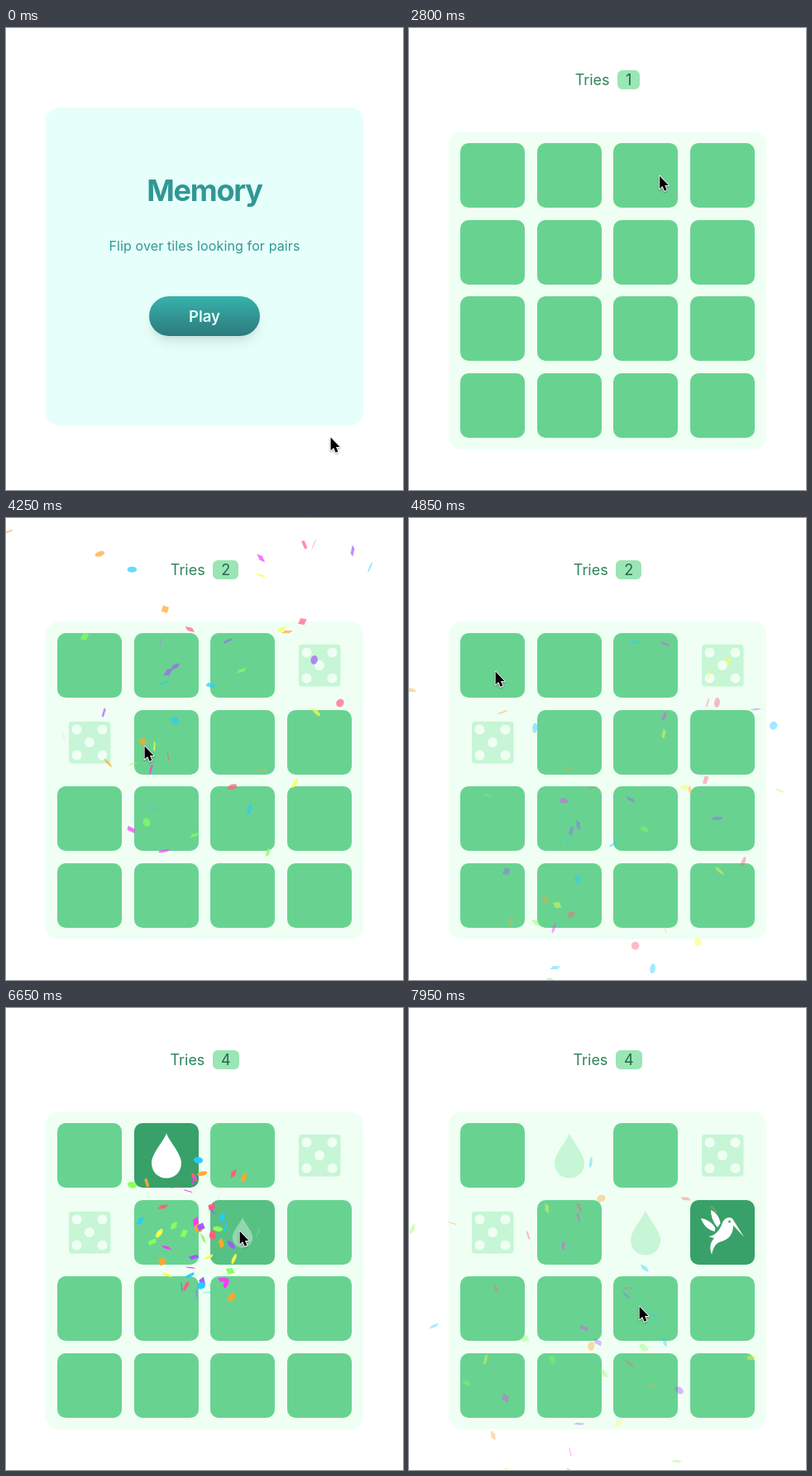
Recreate the animation shown at these times as an HTML page with a canvas. Size 480 px wide and 558 px high, loop 8000 ms.

```html
<!DOCTYPE html>
<html lang="en">
<head>
<meta charset="utf-8">
<title>Memory</title>
<style>
  html, body { margin: 0; width: 100%; height: 100%; overflow: hidden; background: #fff; }
  #stage { position: relative; width: 480px; height: 558px; overflow: hidden; font-family: Inter, "Open Sans", sans-serif; }
  #stage > svg, canvas { position: absolute; left: 0; top: 0; }
  #start { position: absolute; left: 48px; top: 96px; width: 384px; height: 384px; border-radius: 16px; background: #e6fffa; color: #319795; text-align: center; }
  #start > * { position: absolute; left: 0; right: 0; white-space: nowrap; }
  h1 { margin: 0; top: 76px; font-size: 36px; line-height: 48px; letter-spacing: -1.2px; }
  p { margin: 0; top: 155px; font-size: 16px; line-height: 24px; letter-spacing: .13px; }
  #start .play { left: 125px; right: auto; top: 228px; width: 134px; height: 48px; border-radius: 24px; font: 600 18.5px/49px Inter, "Open Sans", sans-serif; color: #e6fffa; background: linear-gradient(#38b2ac, #2c7a7b); }
  #tries { position: absolute; left: 0; right: 0; top: 51px; display: flex; justify-content: center; font-size: 18px; line-height: 23px; color: #2f855a; }
  #count { margin-left: 9.5px; padding: 0 10px; border-radius: 6px; background: #9ae6b4; color: #276749; }
</style>
</head>
<body>
<div id="stage">
  <div id="start">
    <h1>Memory</h1>
    <p>Flip over tiles looking for pairs</p>
    <div class="play">Play</div>
  </div>
  <div id="game">
    <div id="tries">Tries<span id="count">0</span></div>
  </div>
  <svg id="board" width="480" height="558">
    <rect x="48" y="125" width="384" height="384" rx="16" fill="#f0fff4"/>
  </svg>
  <canvas width="480" height="558"></canvas>
  <svg width="480" height="558">
    <g id="cursor" style="filter: drop-shadow(0 1px 1px rgba(0,0,0,.35))">
      <path d="M.6 1.6V17.3L4.2 14 6.6 19.8 9.4 18.6 7 13H11.6Z" stroke="#fff" stroke-width="1.8" stroke-linejoin="round" paint-order="stroke"/>
    </g>
  </svg>
</div>
<script>
const LOOP = 8000, GAME_START = 600, RESOLVE = 600;
const $ = q => document.querySelector(q);
const clamp = v => Math.max(0, Math.min(1, v));
const smooth = k => k * k * (3 - 2 * k);

const dot = (x, y, r) => `M${x - r} ${y}a${r} ${r} 0 1 0 ${2 * r} 0a${r} ${r} 0 1 0 ${-2 * r} 0Z`;
const pips = [-1, 1].flatMap(i => [-1, 1].map(j => dot(39 + 15.5 * i, 39 + 15.5 * j, 6))).join('') + dot(39, 39, 6);
const icons = {
  heart: 'M39 65C36 62 13 48 13 27C13 17 20 12.5 26.5 12.5C33 12.5 37 16.5 39 20C41 16.5 45 12.5 51.5 12.5C58 12.5 65 17 65 27C65 48 42 62 39 65Z',
  drop: 'M39 12.3C37 20 21 37 21 48C21 59 29 66.5 39 66.5S57 59 57 48C57 37 41 20 39 12.3Z',
  dice: 'M18 13.7H60.5a4 4 0 0 1 4 4V60.5a4 4 0 0 1-4 4H18a4 4 0 0 1-4-4V17.7a4 4 0 0 1 4-4Z' + pips,
  moon: 'M45 13A27 27 0 1 0 65 47A22 22 0 0 1 45 13Z',
  bird: 'M25 12C31 15 35.5 20 36.5 28L33 33C28 27 25 20 25 12ZM13 22C20 23 27 27 30.5 34L29.5 38C22 36 16 31 13 22Z'
    + 'M38 30C40 22 47 18.5 51.5 23L65 44.5L52 30.5C52 41 47 48 36 50.5C30 53 28 58 26 65.5C23 58 24 51 29 46L22 44C30 43 35 37 38 30Z' + dot(47.5, 26, 1.4)
};

// Two flips make a try
const flips = [
  { tile: 1, icon: 'drop', at: 1730 }, { tile: 2, icon: 'moon', at: 2140 },
  { tile: 3, icon: 'dice', at: 3130 }, { tile: 4, icon: 'dice', at: 3530 },
  { tile: 0, icon: 'heart', at: 4880 }, { tile: 6, icon: 'drop', at: 5440 },
  { tile: 1, icon: 'drop', at: 6360 }, { tile: 6, icon: 'drop', at: 6550 },
  { tile: 7, icon: 'bird', at: 7470 }
];
const tries = [];
for (let i = 0; i + 1 < flips.length; i += 2) {
  const [a, b] = flips.slice(i, i + 2);
  a.end = b.end = b.at + RESOLVE;
  a.matched = b.matched = a.icon === b.icon;
  tries.push(b);
}

// Cursor stops: arrive, leave, x, y
const stops = [
  [0, 70, 392, 493], [200, 200, 262, 195], [250, 1545, 284, 352], [1720, 1780, 195, 165],
  [1880, 1880, 245, 62], [2000, 2790, 302, 177], [3060, 3160, 372, 186], [3480, 3700, 104, 272],
  [4250, 4400, 167, 274], [4800, 4960, 104, 184], [5280, 6240, 279, 267], [6340, 6400, 200, 184],
  [6530, 6900, 282, 268], [7250, 7550, 355, 271], [7920, LOOP, 278, 359]
];

const svg = (tag, attrs, parent) => {
  const el = document.createElementNS('http://www.w3.org/2000/svg', tag);
  for (const k in attrs) el.setAttribute(k, attrs[k]);
  return parent.appendChild(el);
};

const board = $('#board');
const tiles = Array.from({ length: 16 }, (_, i) => {
  const x = Math.round(62.4 + 92.4 * (i % 4)), y = Math.round(139.4 + 92.4 * Math.floor(i / 4));
  const g = svg('g', {}, board);
  const back = svg('rect', { width: 78, height: 78, rx: 10 }, g);
  const icon = svg('path', { 'fill-rule': 'evenodd' }, g);
  return { x, y, g, back, icon };
});

const scaled = k => `translate(39 39) scale(${k}) translate(-39 -39)`;

function drawTile(tile, i, t) {
  const k = clamp((t - GAME_START - 20 * i) / 330) - 1;
  const pop = 1 + 2.4 * k ** 3 + 1.4 * k ** 2;
  tile.g.setAttribute('transform', `translate(${tile.x} ${tile.y}) ${scaled(Math.max(0, pop))}`);

  const flip = flips.filter(f => f.tile === i && f.at <= t).pop();
  const done = flip && t >= flip.end, matched = done && flip.matched;
  const open = flip && !done ? smooth(clamp((t - flip.at) / 250)) : 0;
  tile.back.style.fill = `color-mix(in srgb, #38a169 ${open * 100}%, #68d391)`;
  tile.back.style.opacity = matched ? 0 : 1;
  tile.icon.style.opacity = matched ? 1 : open;
  if (flip) {
    tile.icon.setAttribute('d', icons[flip.icon]);
    tile.icon.setAttribute('fill', matched ? '#c6f6d5' : '#fff');
    tile.icon.setAttribute('transform', scaled(matched ? 1 : .5 + .5 * open));
  }
}

const colors = ['#26ccff', '#a25afd', '#ff5e7e', '#88ff5a', '#fcff42', '#ffa62d', '#ff36ff'];
const ORIGIN = { x: 240, y: 412 }, FALL = .321, LIFE = 2250;

function random(seed) {
  return () => (seed = (seed * 16807) % 2147483647) / 2147483647;
}

function makeBurst(start) {
  const rnd = random(start * 977);
  const pieces = Array.from({ length: 50 }, (_, i) => {
    const angle = (rnd() - .5) * .9, reach = 225 + 450 * rnd();
    return {
      dx: reach * Math.sin(angle),
      dy: -reach * Math.cos(angle),
      color: colors[i % colors.length],
      round: rnd() < .4,
      wobble: rnd() * 6.3,
      speed: .005 + rnd() * .004,
      tilt: rnd() * 6.3,
      size: 3 + rnd() * 2
    };
  });
  return { start, pieces };
}

const bursts = tries.filter(f => f.matched).map(f => makeBurst(f.at + 50));
const ctx = $('canvas').getContext('2d');

function drawBurst({ start, pieces }, t) {
  const age = t - start;
  if (age < 0 || age > LIFE) return;
  const spread = 1 - Math.exp(-age / 110);
  ctx.globalAlpha = 1 - age / LIFE;
  for (const p of pieces) {
    const x = ORIGIN.x + p.dx * spread;
    const y = ORIGIN.y + p.dy * spread + FALL * age;
    const w = p.wobble + p.speed * age, tilt = p.tilt + .009 * age;
    const a = 10 * Math.cos(w), b = 10 * Math.sin(w);
    ctx.fillStyle = p.color;
    ctx.beginPath();
    if (p.round) {
      ctx.ellipse(x, y, Math.abs(a) * .68, Math.abs(b) * .68, w * Math.PI / 10, 0, 7);
    } else {
      const c = p.size * Math.cos(tilt), d = p.size * Math.sin(tilt);
      const left = x - (a + c) / 2, top = y - (b + d) / 2;
      ctx.moveTo(left, top);
      ctx.lineTo(left + a, top + d);
      ctx.lineTo(left + a + c, top + b + d);
      ctx.lineTo(left + c, top + b);
    }
    ctx.fill();
  }
}

function cursorAt(t) {
  const i = stops.findIndex(s => s[1] >= t);
  const [arrive, , x, y] = stops[i];
  if (t >= arrive) return [x, y];
  const [, leave, x0, y0] = stops[i - 1];
  const k = smooth((t - leave) / (arrive - leave));
  return [x0 + (x - x0) * k, y0 + (y - y0) * k];
}

function render(t) {
  const playing = t >= GAME_START - 10;
  $('#start').style.display = playing ? 'none' : '';
  $('#game').style.display = board.style.display = playing ? '' : 'none';
  $('#count').textContent = tries.filter(f => f.at <= t).length;

  const hover = smooth(clamp((t - 100) / 145)), button = $('.play').style;
  button.transform = `scale(${1 + .05 * hover})`;
  button.boxShadow = `0 ${10 + 4 * hover}px ${15 + 5 * hover}px -3px rgba(0,0,0,.1), 0 4px 6px -2px rgba(0,0,0,.05)`;

  tiles.forEach((tile, i) => drawTile(tile, i, t));
  ctx.clearRect(0, 0, 480, 558);
  bursts.forEach(b => drawBurst(b, t));
  $('#cursor').setAttribute('transform', `translate(${cursorAt(t)})`);
}

function tick() {
  render(performance.now() % LOOP);
  requestAnimationFrame(tick);
}
tick();
</script>
</body>
</html>
```
